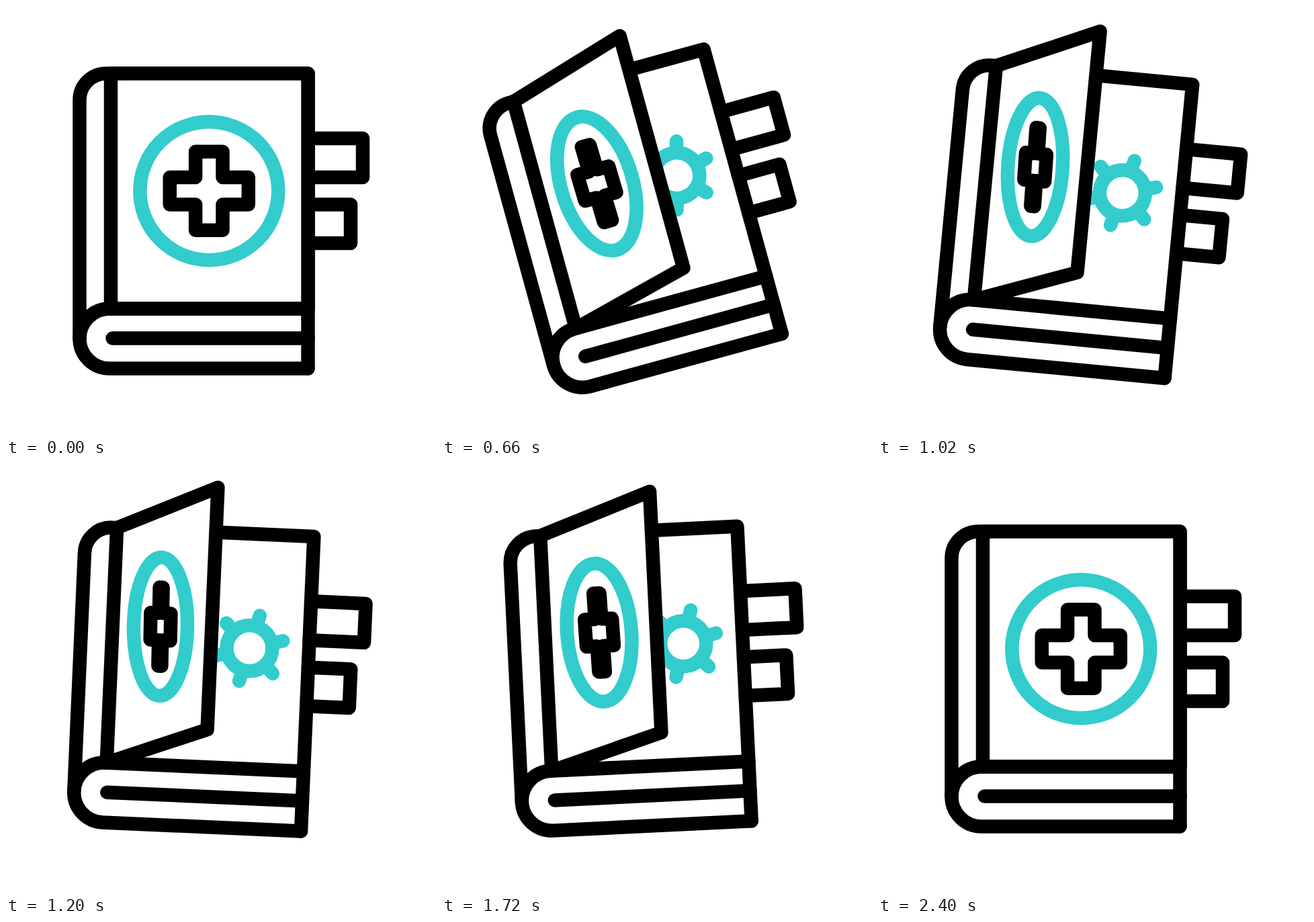
An HTML page for the animation above (3.6 s loop, 640x640 px).

```html
<!DOCTYPE html>
<html lang="en">
<head>
<meta charset="utf-8">
<title>Medical book</title>
<style>
html, body { margin: 0; width: 100%; height: 100%; overflow: hidden; background: #fff; }
svg { display: block; width: 100%; height: 100%; }
</style>
</head>
<body>
<svg viewBox="0 0 640 640" fill="none" stroke="#000" stroke-width="20.5" stroke-linecap="round" stroke-linejoin="round">
  <g id="book">
    <path d="M449.5 197H531V255H449.5M449.5 295.5H513V353H449.5"/>
    <g id="virus" stroke="#33cccc">
      <circle cx="361" cy="271" r="34"/>
      <path id="spikes"/>
    </g>
    <path d="M109.5 495V140A39.5 39.5 0 0 1 149 100.5H449.5V539.5"/>
    <path id="cover" fill="#fff"/>
    <g id="emblem">
      <ellipse id="ring" ry="103" stroke="#33cccc"/>
      <path id="cross"/>
    </g>
    <path d="M449.5 450.5H154A44.5 44.5 0 0 0 154 539.5H449.5M158.5 494.5H449.5"/>
  </g>
</svg>
<script>
const LOOP = 3600, STEP = 20;
const el = id => document.getElementById(id);
const mix = (a, b, k) => a + (b - a) * k;
const smooth = x => x * x * (3 - 2 * x);
const clamp = x => Math.min(1, Math.max(0, x));

// Cubic bezier easing with handles (a, 0) and (b, 1).
function ease(x, a, b) {
  let lo = 0, hi = 1;
  for (let i = 0; i < 30; i++) {
    const s = (lo + hi) / 2, r = 1 - s;
    if (3 * a * s * r * r + 3 * b * s * s * r + s * s * s < x) lo = s;
    else hi = s;
  }
  return smooth(lo);
}

// Tilt of the whole book: [time, degrees].
const swing = [[250, 0], [745, -16], [1090, 8], [1375, -8.5], [1523, 5], [1700, -3], [1850, 1.5], [1990, 0]];

function tilt(t) {
  const i = swing.findIndex(k => k[0] > t);
  if (i < 1) return 0;
  const [t0, a0] = swing[i - 1], [t1, a1] = swing[i];
  const x = (t - t0) / (t1 - t0);
  return mix(a0, a1, i === 1 ? ease(x, 0.957, 0.4) : smooth(x));
}

function openness(t) {
  if (t < 1200) return ease(t / 1200, 0.85, 0.1);
  return 1 - ease(clamp((t - 1200) / 1200), 0.856, 0.677);
}

function crossPath(arm, half) {
  const v = 58.5, h = 20.2;
  return `M${-arm} ${-v}H${arm}V${-h}H${half}V${h}H${arm}V${v}H${-arm}V${h}H${-half}V${-h}H${-arm}Z`;
}

function draw(t) {
  const p = openness(t);
  const right = mix(449.5, 303.5, p);
  const top = mix(100.5, 34, p), bottom = mix(450.5, 394.5, p);
  el('book').setAttribute('transform', `rotate(${tilt(t)} 286 305)`);
  el('virus').setAttribute('visibility', p > 0.02 ? 'visible' : 'hidden');
  el('cover').setAttribute('d', `M156 100.5L${right} ${top}V${bottom}L156 450.5Z`);
  el('emblem').setAttribute('transform',
    `matrix(1 0 ${0.025 * p} 1 ${302.3 - 75 * p} ${275.2 - 30.6 * p})`);
  el('ring').setAttribute('rx', mix(103, 40, p));
  el('cross').setAttribute('d', crossPath(mix(20.2, 2.5, p), mix(58.5, 15, p)));
}

let spikes = '';
for (let i = 0; i < 6; i++) {
  const a = (i * 60 - 15) * Math.PI / 180, c = Math.cos(a), s = Math.sin(a);
  spikes += `M${361 + 36 * c} ${271 + 36 * s}L${361 + 51 * c} ${271 + 51 * s}`;
}
el('spikes').setAttribute('d', spikes);

const start = performance.now();
function tick() {
  const t = (performance.now() - start) % LOOP;
  draw(Math.floor(t / STEP) * STEP);
  requestAnimationFrame(tick);
}
draw(0);
requestAnimationFrame(tick);
</script>
</body>
</html>
```
